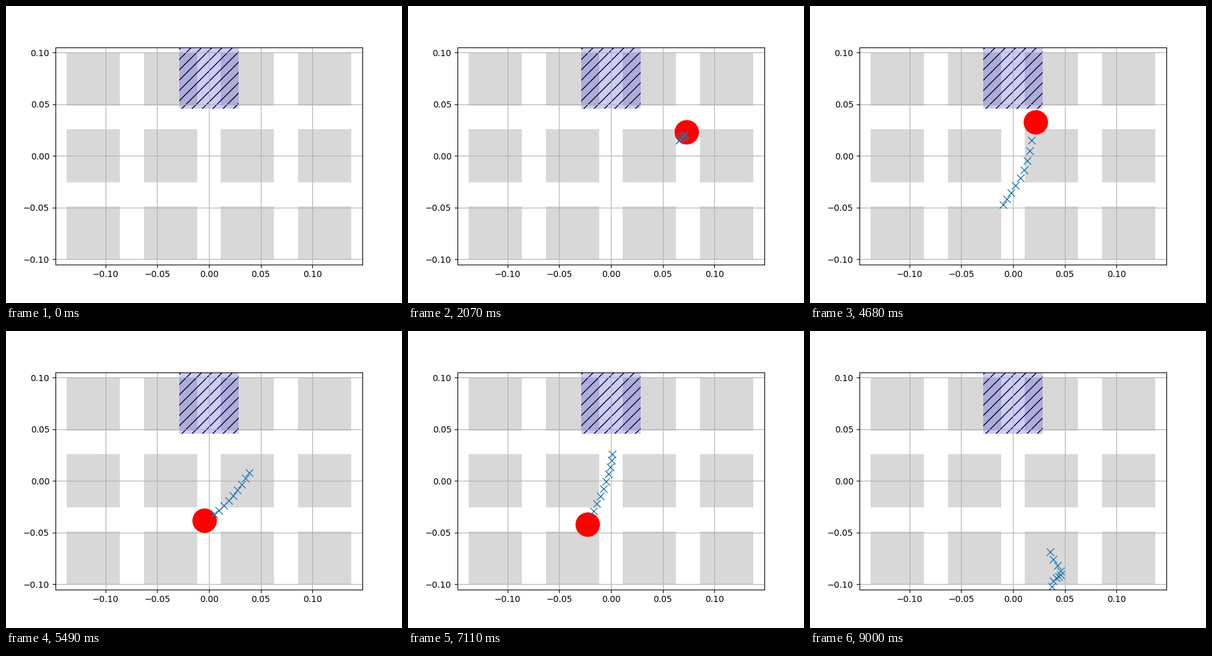
Recreate the animation shown at these times as a matplotlib script. Size 640 by 480 pixels, loop 9030 ms.

```python
import numpy as np
import matplotlib.pyplot as plt
from matplotlib.animation import FuncAnimation
from matplotlib.patches import Circle, Rectangle

FRAMES, INTERVAL = 301, 30
SCALE = 1670  # pixels per data unit

# Turning points of the ball: step, x, y in stage pixels
TURNS = [
    (1, 330, 378), (17, 104, 247), (32, 252, 284), (38, 305, 281),
    (62, 435, 219), (72, 454, 198), (93, 422, 161), (97, 372, 161),
    (101, 346, 175), (124, 249, 306), (136, 275, 348), (147, 318, 312),
    (151, 346, 265), (156, 365, 188), (160, 383, 156), (167, 407, 185),
    (186, 300, 312), (199, 212, 241), (204, 211, 187), (209, 238, 130),
    (217, 300, 120), (226, 330, 190), (243, 281, 351), (256, 366, 289),
    (261, 378, 236), (266, 372, 190), (272, 336, 158), (284, 409, 265),
    (290, 388, 357), (293, 405, 388), (298, 391, 413), (300, 391, 445),
]


def smooth(t, keys, vals):
    """Cubic Hermite curve through the turning points."""
    slope = np.gradient(vals, keys)
    i = np.clip(np.searchsorted(keys, t, side="right") - 1, 0, len(keys) - 2)
    h = keys[i + 1] - keys[i]
    u = (t - keys[i]) / h
    return ((1 + 2 * u) * (1 - u) ** 2 * vals[i]
            + u * (1 - u) ** 2 * h * slope[i]
            + u * u * (3 - 2 * u) * vals[i + 1]
            + u * u * (u - 1) * h * slope[i + 1])


keys, px, py = np.array(TURNS, float).T
steps = np.arange(FRAMES)
path_x = (smooth(steps, keys, px) - 328) / SCALE
path_y = (242.4 - smooth(steps, keys, py)) / SCALE

fig, ax = plt.subplots(figsize=(6.4, 4.8), dpi=100)
ax.set_aspect("equal")
ticks = np.linspace(-0.1, 0.1, 5)
ax.set_xticks(ticks)
ax.set_yticks(ticks)
ax.set_xlim(-0.1485, 0.1485)
ax.set_ylim(-0.105, 0.105)
ax.grid(True)

SIDE, PITCH = 0.0515, 0.0746
for row in (-1, 0, 1):
    for col in (-1.5, -0.5, 0.5, 1.5):
        corner = (col * PITCH - SIDE / 2, row * PITCH - SIDE / 2)
        ax.add_patch(Rectangle(corner, SIDE, SIDE, facecolor=(0.5, 0.5, 0.5, 0.3)))
ax.add_patch(Rectangle((-0.0287, 0.0457), 0.0574, 0.0743,
                       facecolor=(0, 0, 1, 0.2), hatch="//"))

ball = ax.add_patch(Circle((0, 0), 0.0114, color="red", zorder=1.8, visible=False))
trail, = ax.plot([], [], "x", color="C0", markersize=8, markeredgewidth=1)


def update(n):
    ball.set_visible(n > 0)
    ball.center = path_x[n], path_y[n]
    # The trail lags two steps and later grows from five to nine marks
    count = min(9, max(5, n - 105))
    end = max(1, n - 1)
    past = slice(max(1, end - count), end)
    trail.set_data(path_x[past], path_y[past])
    return ball, trail


anim = FuncAnimation(fig, update, frames=FRAMES, interval=INTERVAL,
                     repeat=True, repeat_delay=0, blit=False)
plt.show()
```
